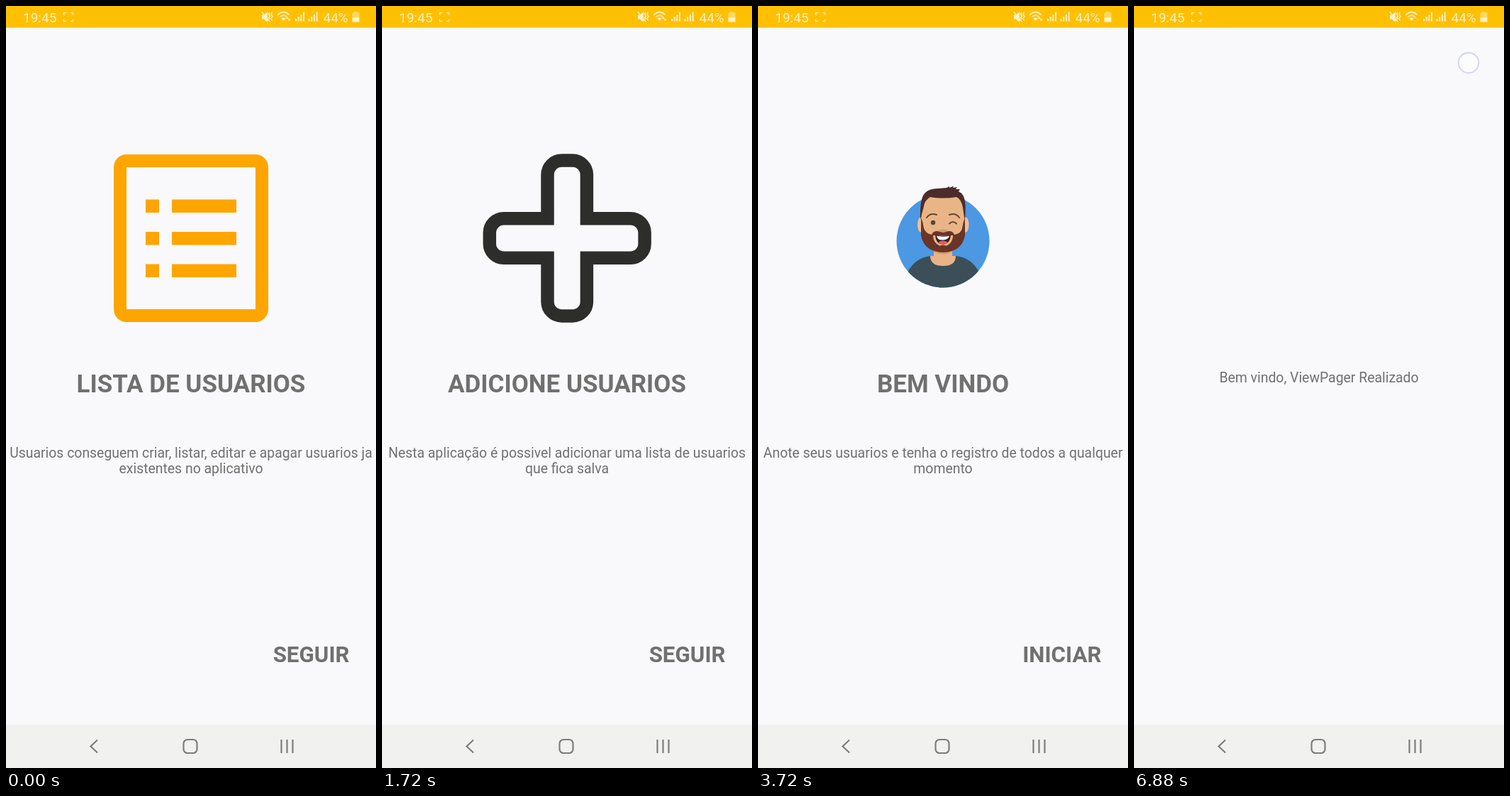
An HTML page for the animation above (6920 ms loop, 522 by 1073 pixels).

```html
<!DOCTYPE html>
<html lang="pt">
<head>
<meta charset="utf-8">
<style>
  html, body { margin: 0; width: 100%; height: 100%; overflow: hidden; background: #f9f9fb; }
  svg { display: block; width: 522px; height: 1073px; font-family: Roboto, sans-serif; fill: #707070; }
  .title { font-size: 35px; font-weight: 700; text-anchor: middle; }
  .body { font-size: 19.4px; text-anchor: middle; }
  .next { font-size: 31.3px; font-weight: 700; text-anchor: end; }
  .line { fill: none; }
</style>
</head>
<body>
<svg viewBox="0 0 522 1073">
  <defs>
    <clipPath id="disc"><circle cx="261" cy="331" r="65.5"/></clipPath>
  </defs>

  <g id="pager">
    <g id="page0">
      <path fill="#ffa500" fill-rule="evenodd" d="M170 209H352a18 18 0 0 1 18 18V427a18 18 0 0 1-18 18H170a18 18 0 0 1-18-18V227a18 18 0 0 1 18-18ZM170 227V427H352V227Z"/>
      <path fill="#ffa500" d="M197 272.5h19v18.5h-19zM234 272.5h91v18.5h-91zM197 318h19v18.5h-19zM234 318h91v18.5h-91zM197 363.5h19v18.5h-19zM234 363.5h91v18.5h-91z"/>
    </g>

    <g id="page1">
      <path class="line" transform="translate(261.2 327)" stroke="#2d2d2c" stroke-width="18.5"
        d="M-27.7-27.7V-89.4a20 20 0 0 1 20-20H7.7a20 20 0 0 1 20 20V-27.7H89.4a20 20 0 0 1 20 20V7.7a20 20 0 0 1-20 20H27.7V89.4a20 20 0 0 1-20 20H-7.7a20 20 0 0 1-20-20V27.7H-89.4a20 20 0 0 1-20-20V-7.7a20 20 0 0 1 20-20Z"/>
    </g>

    <g id="page2">
      <circle cx="261" cy="331" r="65.5" fill="#4c98e3"/>
      <path clip-path="url(#disc)" fill="#3c4f58" d="M205 400L211 375Q222 354 244 352H279Q301 354 312 375L318 400Z"/>
      <path fill="#e8b386" d="M248 335H274V352H279Q279 366 261 366T243 352H248Z"/>
      <path fill="#d59b6d" d="M248 342Q261 352 274 342V346Q261 353 248 346Z"/>
      <g fill="#f0be97">
        <ellipse cx="229.5" cy="308" rx="4.5" ry="10.5"/>
        <ellipse cx="293" cy="308" rx="4.5" ry="10.5"/>
      </g>
      <path fill="#e9b587" d="M231 285Q232 264 261 264T291 285V322Q289 345 261 345T231 322Z"/>
      <path fill="#6b3426" d="M230 298Q233 305 234 313Q236 320 245 322Q248 314 261 319Q274 314 277 322Q287 320 288 313Q289 305 292 298V323Q288 346 261 347Q234 346 230 323Z"/>
      <path fill="#e9b587" d="M247 323H275Q275 336 261 339Q247 336 247 323Z"/>
      <path fill="#6b3426" d="M253 340Q261 333 269 340L266 345H256Z"/>
      <path fill="#3b1c1c" d="M250 322Q261 325 272 322Q271 335 261 335.500T250 322Z"/>
      <path fill="#fff" d="M252 323.500Q261 326 270 323.500Q269 329 261 329.500T252 323.500Z"/>
      <ellipse cx="261" cy="333" rx="6" ry="2.500" fill="#ef5467"/>
      <ellipse cx="261" cy="316.500" rx="6" ry="2" fill="#cf9a6e"/>
      <path fill="#4a2d2b" d="M229 301Q228 276 233 267Q238 257 254 257L266 256L270 254V256L276 253.500L275 256L281 255L279 258L285 258L283 261Q292 265 292.500 280T291.500 301L289 284Q287 272 280 269Q261 272 243 269Q235 273 233.500 284Z"/>
      <circle cx="247" cy="305" r="3.200" fill="#5c4231"/>
      <path class="line" stroke="#68452f" stroke-width="2" stroke-linecap="round" d="M238 298Q243 291 252 294M270 294Q279 291 284 298M270 306.500Q275 301.500 280 306.500"/>
    </g>
  </g>

  <text id="done" class="body" x="261" y="529.500">Bem vindo, ViewPager Realizado</text>

  <circle id="touch" r="14.300" fill="#fff" fill-opacity=".45" stroke="#d4d5ee" stroke-width="2"/>

  <path fill="#ffc003" d="M0 0H522V30.500H0Z"/>
  <g fill="#fff1c4" stroke="#fff1c4" stroke-width="0">
    <text x="24" y="22.500" font-size="19">19:45</text>
    <text x="447.500" y="22.500" font-size="19">44%</text>
    <path id="brackets" class="line" stroke-width="1.500" d="M81.500 13V9.500H85M91 9.500H94.500V13M94.500 18V21.500H91M85 21.500H81.500V18"/>
    <g id="recording" class="line" stroke-width="1.500">
      <path d="M84 12.500H89.500V18.500H84ZM89.500 15L92.500 13V18L89.500 16"/>
    </g>
    <path d="M361 12.500H364L369 8V23L364 18.500H361Z"/>
    <path class="line" stroke-width="1.500" d="M361 8.500L372 22M372 9L370.500 11.500L372.500 14L370.500 16.500L372.500 19M375.500 8.500L374 11.500L376 14.500L374 17.500L375.500 20.500"/>
    <path class="line" stroke-width="1.700" d="M383.500 12.500Q391.500 4.500 399.500 12.500M386.500 15.500Q391.500 10.500 396.500 15.500"/>
    <path d="M388.500 17.500Q391.500 15 394.500 17.500L391.500 21Z"/>
    <path id="traffic" d="M395 18L397 15.500L399 18ZM397.500 18.500H402L399.700 21.500Z"/>
    <path d="M408 18h2v3.500h-2zM411.700 15h2v6.500h-2zM415.400 12h2v9.500h-2zM419 8.500h2v13h-2zM426.500 18h2v3.500h-2zM430.200 15h2v6.500h-2zM434 12h2v9.500h-2zM437.700 8.500h2v13h-2z"/>
    <path opacity=".5" d="M491 8H496V9.500H498.500V16H488.500V9.500H491Z"/>
    <path d="M488.500 16H498.500V22.500H488.500Z"/>
  </g>

  <path fill="#f1f1f0" d="M0 1012H522V1073H0Z"/>
  <g class="line" stroke="#7d7d7d" stroke-width="2.200">
    <path d="M129 1033.500L119.500 1042.500L129 1051.500M388.500 1033V1052M396.500 1033V1052M404.500 1033V1052"/>
    <rect x="250.500" y="1033" width="19" height="19" rx="5.500"/>
  </g>
</svg>

<script>
const LOOP = 6920, STEP = 40, WIDTH = 522;
const $ = id => document.getElementById(id);

const pages = [
  ['LISTA DE USUARIOS', 'Usuarios conseguem criar, listar, editar e apagar usuarios ja', 'existentes no aplicativo', 'SEGUIR'],
  ['ADICIONE USUARIOS', 'Nesta aplicação é possivel adicionar uma lista de usuarios', 'que fica salva', 'SEGUIR'],
  ['BEM VINDO', 'Anote seus usuarios e tenha o registro de todos a qualquer', 'momento', 'INICIAR']
];

function addText(parent, className, x, y, content) {
  const node = document.createElementNS(parent.namespaceURI, 'text');
  node.setAttribute('class', className);
  node.setAttribute('x', x);
  node.setAttribute('y', y);
  node.textContent = content;
  parent.append(node);
}

pages.forEach(([title, first, second, button], i) => {
  const page = $('page' + i);
  page.setAttribute('transform', `translate(${i * WIDTH} 0)`);
  addText(page, 'title', 261, 544, title);
  addText(page, 'body', 261, 635.5, first);
  addText(page, 'body', 261, 658, second);
  addText(page, 'next', 484.5, 923.5, button);
});

const swipes = [
  { start: 600, drag: 415, settle: 320, endX: 130, endY: 807 },
  { start: 2160, drag: 324, settle: 400, endX: 123, endY: 799 }
];
const FINGER_X = 445, SLOP = 14;
const clamp = v => Math.min(1, Math.max(0, v));

// The finger accelerates, then the page snaps with a quintic ease-out.
function swipeAt(t, s) {
  const u = t - s.start;
  const pull = clamp(u / s.drag) ** 2;
  const x = FINGER_X + (s.endX - FINGER_X) * pull;
  const dragged = Math.max(0, FINGER_X - SLOP - x);
  const snap = 1 - (1 - clamp((u - s.drag) / s.settle)) ** 5;
  return {
    offset: dragged + (WIDTH - dragged) * snap,
    finger: u >= 0 && u < s.drag ? [x, s.endY + 19 * (1 - pull)] : null
  };
}

function show(id, opacity) {
  $(id).setAttribute('opacity', +opacity);
}

function render(now) {
  const t = Math.floor(now % LOOP / STEP) * STEP;
  let offset = 0, finger = null;
  for (const s of swipes) {
    const state = swipeAt(t, s);
    offset += state.offset;
    finger = finger || state.finger;
  }
  if (t >= 4520 && t < 4600) finger = [430, 912];
  if (t >= 6720) finger = [472, 80];

  const fade = clamp((t - 4560) / 200);
  $('pager').setAttribute('transform', `translate(${-offset} 0)`);
  show('pager', 1 - fade);
  show('done', fade);

  show('touch', !!finger);
  if (finger) $('touch').setAttribute('transform', `translate(${finger})`);

  const blink = t % 1000 >= 200 && t % 1000 < 720;
  show('recording', blink);
  show('brackets', blink ? 1 : 0.8);
  show('traffic', t < 5280 ? 1 : 0.35);
  requestAnimationFrame(render);
}
requestAnimationFrame(render);
</script>
</body>
</html>
```
